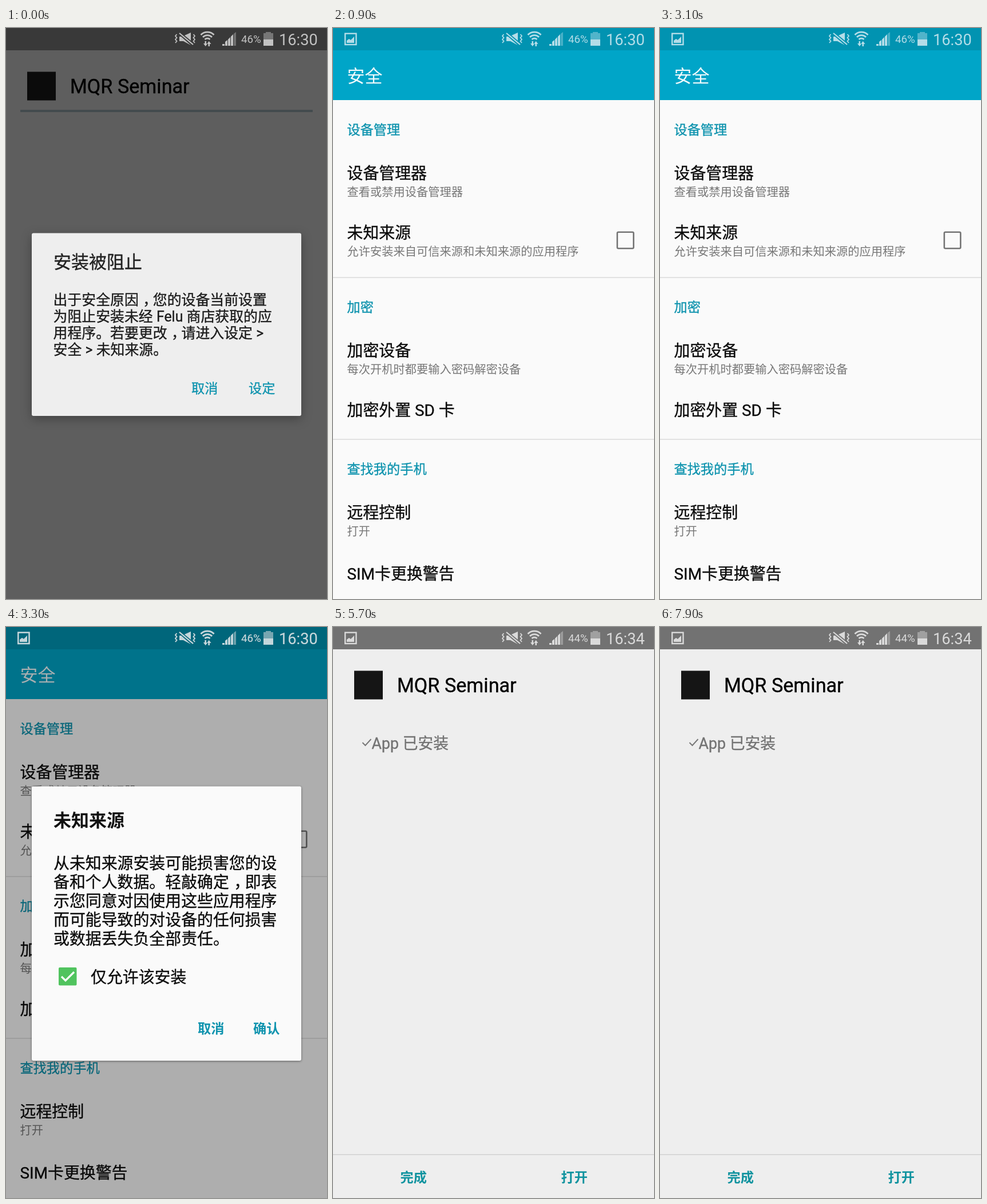
Recreate the animation shown at these times as an HTML page. Size 561x998 px, loop 8 s.

```html
<!DOCTYPE html>
<html lang="zh-CN">
<head>
<meta charset="utf-8">
<title>安装设置</title>
<style>
html, body { margin: 0; width: 100%; height: 100%; overflow: hidden; background: #eee; }
svg { display: block; width: 100%; height: 100%; font-family: Roboto, "Noto Sans CJK SC", sans-serif; }
text { white-space: pre; }
.bold { font-weight: 700; }
.firm { stroke: currentColor; stroke-width: .35; }
.title { font-size: 31px; }
.section { font-size: 23.2px; fill: #0e93ae; color: #0e93ae; }
.item { font-size: 27.9px; fill: #0c0c0c; color: #0c0c0c; }
.note { font-size: 20.25px; fill: #777; color: #777; }
.small { font-size: 24.9px; fill: #1c1c1c; color: #1c1c1c; }
.app { font-size: 34.2px; fill: #000; color: #000; }
.done { fill: #10939f; }
.card1 { filter: drop-shadow(0 5px 9px rgba(0,0,0,.3)); }
.card2 { filter: drop-shadow(0 1px 2px rgba(0,0,0,.45)); }

.scene, .tap { opacity: 0; animation: 8s step-end infinite; }
#blocked { animation-name: blocked; }
#security { animation-name: security; }
#confirm { animation-name: confirm; }
#installed { animation-name: installed; }
.tap { fill: #898989; animation-name: tap; }
@keyframes blocked { 0% { opacity: 1 } 11.25%, 100% { opacity: 0 } }
@keyframes security { 0% { opacity: 0 } 11.25% { opacity: 1 } 71.25%, 100% { opacity: 0 } }
@keyframes confirm { 0% { opacity: 0 } 41.25% { opacity: 1 } 71.25%, 100% { opacity: 0 } }
@keyframes installed { 0% { opacity: 0 } 71.25%, 100% { opacity: 1 } }
@keyframes tap {
  0% { opacity: 0 }
  6.25% { opacity: .47; transform: translate(449.5px, 626.5px) }
  8.75% { opacity: 0 }
  36.25% { opacity: .47; transform: translate(481.5px, 372.5px) }
  38.75% { opacity: 0 }
  66.25% { opacity: .47; transform: translate(454px, 698.5px) }
  68.75% { opacity: 0 }
  96.25% { opacity: .47; transform: translate(419.5px, 958.5px) }
  98.75%, 100% { opacity: 0 }
}
</style>
</head>
<body>
<svg viewBox="0 0 561 998" preserveAspectRatio="none">
  <defs>
    <g id="icons" fill="currentColor">
      <path d="M312 13l11-5v14zM303 15h3l17 15-13-7h-7z"/>
      <g fill="none" stroke="currentColor">
        <path d="M303 9l24 20" stroke-width="2.2"/>
        <path d="M298.500 11l-2.500 3 2.500 3-2.500 3 2.500 3-2.500 3M327.500 11l2.500 3-2.500 3 2.500 3-2.500 3 2.500 3" stroke-width="1.800"/>
        <path d="M340.500 12a16 16 0 0 1 23 0M344 16a11 11 0 0 1 16 0M347.500 20a6.500 6.500 0 0 1 9 0" stroke-width="2.800"/>
      </g>
      <path d="M347.500 23h2.500v4h2.500l-3.800 5-3.700-5h2.500zM353.500 32h2.500v-4h2.500l-3.800-5-3.700 5h2.500z"/>
      <path d="M378 28h4v3h-4zM383 24l4-3v10h-4zM388 20l4-4v15h-4zM393 15l4-4v20h-4z"/>
      <path d="M398 10l4-3v24h-4z" opacity=".4"/>
      <path d="M454 7h9v2h4v11h-17V9h4z" opacity=".45"/>
      <path d="M450 20h17v11h-17z"/>
    </g>
    <g id="picture">
      <rect x="21.200" y="9.700" width="19.300" height="19.300" fill="none" stroke="currentColor" stroke-width="2.400"/>
      <path d="M24 26v-4l4-3 3 2 6-6v11z" fill="currentColor"/>
    </g>
  </defs>

  <g id="blocked" class="scene">
    <rect width="561" height="998" fill="#5e5e5e"/>
    <rect width="561" height="39" fill="#393939"/>
    <g class="status" color="#c2c2c2" data-level="46%" data-clock="16:30"></g>
    <rect x="37" y="76.500" width="50" height="50" fill="#0b0b0b"/>
    <text class="app firm" x="112" y="114">MQR Seminar</text>
    <rect x="25" y="143" width="511" height="4" fill="#434b4e"/>
    <rect class="card1" x="45" y="358.500" width="471" height="319.500" rx="3" fill="#eee"/>
    <text class="title firm" x="83" y="419.500" fill="#222" color="#222">安装被阻止</text>
    <g class="small firm lines" data-x="82.5" data-y="483.5" data-step="29">出于安全原因，您的设备当前设置|为阻止安装未经 Felu 商店获取的应|用程序。若要更改，请进入设定 &gt;|安全 &gt; 未知来源。</g>
    <text class="section firm" x="324" y="637.500">取消</text>
    <text class="section firm" x="424" y="637.500">设定</text>
  </g>

  <g id="security" class="scene">
    <rect width="561" height="998" fill="#fafafa"/>
    <rect width="561" height="126" fill="#00a5c8"/>
    <rect width="561" height="39" fill="#0193b1"/>
    <g class="status" color="#b4dde8" data-level="46%" data-clock="16:30" data-picture="1"></g>
    <text class="title" x="24.500" y="94.500" fill="#f2fafc">安全</text>
    <text class="section firm" x="24.500" y="185.500">设备管理</text>
    <text class="item firm" x="24.500" y="263.500">设备管理器</text>
    <text class="note" x="24.500" y="293.500">查看或禁用设备管理器</text>
    <text class="item firm" x="24.500" y="368">未知来源</text>
    <text class="note" x="24.500" y="398">允许安装来自可信来源和未知来源的应用程序</text>
    <rect x="496.800" y="356.800" width="28.500" height="28.500" rx="2" fill="none" stroke="#757575" stroke-width="2.600"/>
    <rect y="435.500" width="561" height="1.300" fill="#d6d6d6"/>
    <text class="section firm" x="24.500" y="495.500">加密</text>
    <text class="item firm" x="24.500" y="573.500">加密设备</text>
    <text class="note" x="24.500" y="604">每次开机时都要输入密码解密设备</text>
    <text class="item firm" x="24.500" y="678">加密外置 SD 卡</text>
    <rect y="718.300" width="561" height="1.300" fill="#d6d6d6"/>
    <text class="section firm" x="24.500" y="778.500">查找我的手机</text>
    <text class="item firm" x="24.500" y="857">远程控制</text>
    <text class="note" x="24.500" y="887">打开</text>
    <text class="item firm" x="24.500" y="964">SIM卡更换警告</text>
  </g>

  <g id="confirm" class="scene">
    <rect width="561" height="998" opacity=".3"/>
    <g class="status" color="#c4d6db" data-level="46%" data-clock="16:30" data-picture="1"></g>
    <rect class="card2" x="45" y="278.500" width="471" height="479.500" rx="3" fill="#fafafa"/>
    <text class="title bold" x="83" y="349" fill="#111">未知来源</text>
    <g class="item firm lines" data-x="83" data-y="422.5" data-step="33">从未知来源安装可能损害您的设|备和个人数据。轻敲确定，即表|示您同意对因使用这些应用程序|而可能导致的对设备的任何损害|或数据丢失负全部责任。</g>
    <rect x="92" y="595" width="31.500" height="31.500" rx="2" fill="#50c35e"/>
    <path d="M97 611l7 7 15-15" fill="none" stroke="#fff" stroke-width="3.200"/>
    <text class="item firm" x="148" y="621.500">仅允许该安装</text>
    <text class="section bold" x="335" y="710">取消</text>
    <text class="section bold" x="432" y="710">确认</text>
  </g>

  <g id="installed" class="scene">
    <rect width="561" height="998" fill="#eee"/>
    <rect width="561" height="39" fill="#727272"/>
    <g class="status" color="#dadada" data-level="44%" data-clock="16:34" data-picture="1"></g>
    <rect x="37" y="76.500" width="50" height="50" fill="#151515"/>
    <text class="app firm" x="112" y="114">MQR Seminar</text>
    <path d="M51.500 202l5 5 10-11" fill="none" stroke="#777" stroke-width="1.900"/>
    <text class="firm" x="67.500" y="213" font-size="26.800" fill="#737373" color="#737373">App 已安装</text>
    <rect y="921.500" width="561" height="1.400" fill="#cfcfcf"/>
    <text class="section bold done" x="117.500" y="969.500">完成</text>
    <text class="section bold done" x="398.500" y="969.500">打开</text>
  </g>

  <circle class="tap" r="82.500"/>
</svg>
<script>
for (const bar of document.querySelectorAll('.status')) {
  const { level, clock, picture } = bar.dataset;
  bar.innerHTML = `<use href="#icons"/>${picture ? '<use href="#picture"/>' : ''}
    <text x="411" y="26" font-size="18.8" fill="currentColor">${level}</text>
    <text x="477" y="30" font-size="27.2" fill="currentColor">${clock}</text>`;
}

// Break paragraphs into lines; commas sit in the middle of their cell.
const centredComma = '<tspan dx=".3em">，</tspan><tspan dx="-.3em">$1</tspan>';
for (const block of document.querySelectorAll('.lines')) {
  const { x, y, step } = block.dataset;
  block.innerHTML = block.innerHTML.split('|').map((line, i) =>
    `<text x="${x}" y="${+y + i * step}">${line.replace(/，(.*)/, centredComma)}</text>`
  ).join('');
}
</script>
</body>
</html>
```
